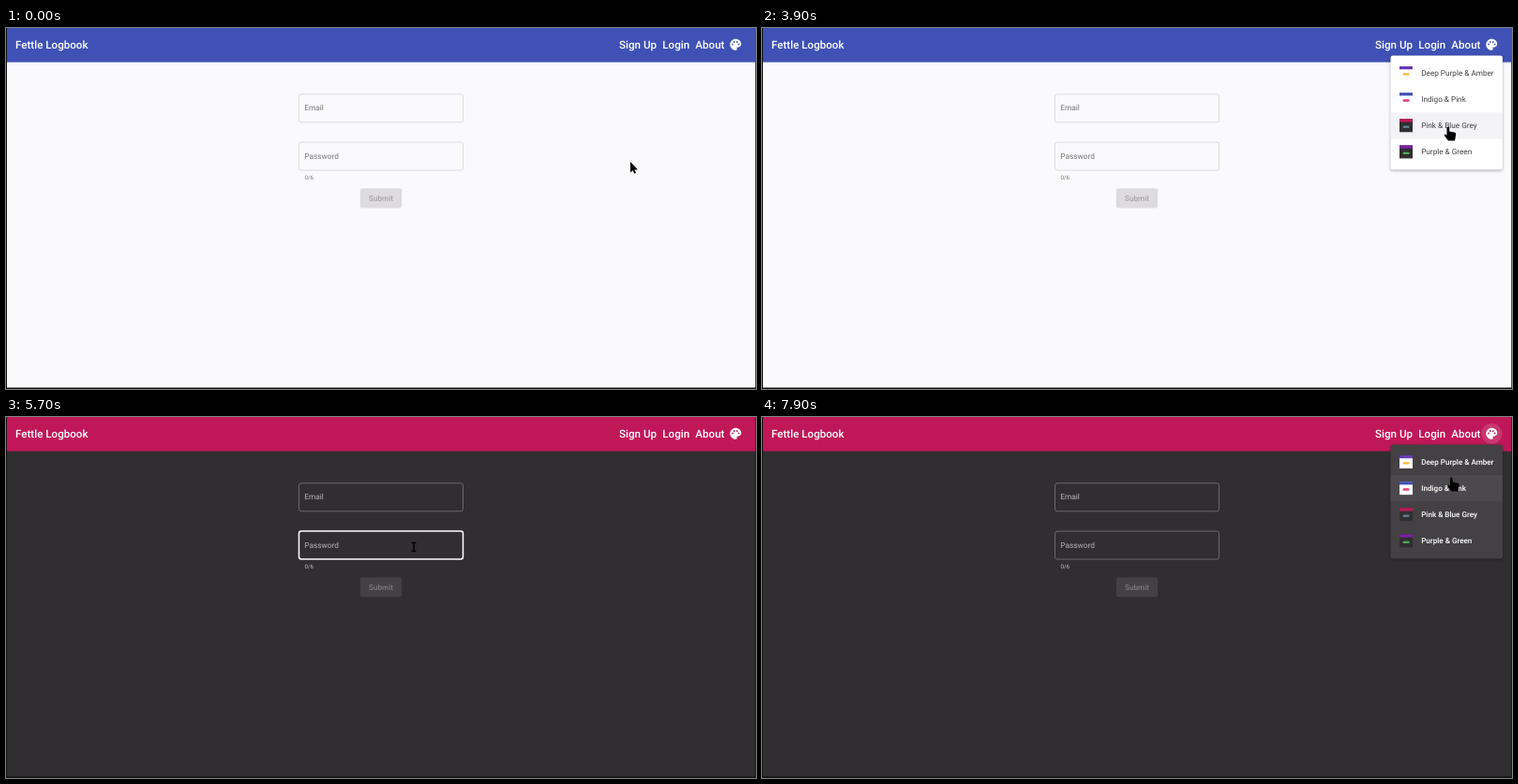
Animation of 800x386 px, one loop 8000 ms. Source, as an HTML page:

```html
<!DOCTYPE html>
<html lang="en">
<head>
<meta charset="utf-8">
<title>Theme picker</title>
<style>
html, body { margin: 0; width: 100%; height: 100%; overflow: hidden; background: #111; }
svg { display: block; width: 800px; height: 386px; font-family: Roboto, sans-serif; text-rendering: geometricPrecision;
  --bar: #3f51b5; --page: #faf9fc; --line: #dddbdf; --label: #767479; --hint: #767479;
  --button: #dddbde; --off: #a5a3a7; --menu: #fff; --hover: #f3f2f5; --item: #403e42; --strong: #29272b; }
svg.dark { --bar: #c01759; --page: #302e31; --line: #6b696d; --label: #b6b4b8; --hint: #c4c2c5;
  --button: #434144; --off: #7f7d80; --menu: #434144; --hover: #4b494d; --item: #fff; --strong: #fff; }
svg.switching { --label: #929094; --hint: #d5d3d6; --button: #3f3d40; --line: #737175; }
.nav { font-size: 11.6px; font-weight: 500; fill: #fff; }
.label { font-size: 8.3px; fill: var(--label); }
.hint { font-size: 6.15px; fill: var(--hint); }
.submit { font-size: 8.15px; font-weight: 500; fill: var(--off); text-anchor: middle; }
.item { font-size: 8.2px; fill: var(--item); }
.dark .item { font-weight: 500; font-size: 8.1px; }
.field { fill: none; stroke: var(--line); }
.field.over { stroke: var(--strong); stroke-width: 1.5; }
#panel { fill: var(--menu); filter: drop-shadow(0 1.5px 1.8px #0005); }
#hover { fill: var(--hover); }
</style>
</head>
<body>
<svg id="stage" viewBox="0 0 800 386">
  <rect width="800" height="386" fill="#111"/>
  <rect x="1" width="798.3" height="384.5" fill="var(--page)"/>
  <rect x="1" width="798.3" height="36.6" fill="var(--bar)"/>
  <g class="nav">
    <text x="10" y="22">Fettle Logbook</text>
    <text x="654" y="22">Sign Up</text>
    <text x="700.3" y="22">Login</text>
    <text x="735.3" y="22">About</text>
  </g>
  <circle id="ripple" cx="778.3" cy="17.7" r="11" fill="#fff"/>
  <g transform="translate(771.1 10.5) scale(.6)">
    <path fill="#fff" d="M12 2C6.49 2 2 6.49 2 12s4.49 10 10 10c1.38 0 2.5-1.12 2.5-2.5 0-.61-.23-1.2-.64-1.67-.08-.1-.13-.21-.13-.33 0-.28.22-.5.5-.5H16c3.31 0 6-2.69 6-6 0-4.96-4.49-9-10-9z"/>
    <g fill="var(--bar)">
      <circle cx="6.5" cy="11.5" r="1.5"/><circle cx="9.5" cy="7.5" r="1.5"/>
      <circle cx="14.5" cy="7.5" r="1.5"/><circle cx="17.5" cy="11.5" r="1.5"/>
    </g>
  </g>
  <rect id="email" class="field" x="312.5" y="70.8" width="175" height="30" rx="2.5"/>
  <text class="label" x="318.3" y="88.4">Email</text>
  <rect id="password" class="field" x="312.5" y="122.1" width="175" height="30" rx="2.5"/>
  <text class="label" x="318.3" y="139.9">Password</text>
  <text class="hint" x="318.5" y="161.5">0/6</text>
  <rect x="377.8" y="171.5" width="44.4" height="21" rx="2.3" fill="var(--button)"/>
  <text class="submit" x="400" y="184.7">Submit</text>
  <g id="menu">
    <rect id="panel" x="670.5" y="29.6" width="119.5" height="122" rx="2.3"/>
    <rect id="hover" x="670.5" width="119.5" height="28.1"/>
    <g id="items"></g>
  </g>
  <g id="cursor">
    <path id="arrow" d="M0 0V11.5L2.6 9.2 4.2 12.8 6 12 4.4 8.4H8Z"/>
    <path id="hand" d="M-1.5 1C-1.5-.7 1.2-.7 1.2 1V4.6L7 5.7Q8.4 6.1 8.2 7.8L7 14.5H0L-4 9.2Q-4.6 7.6-3 7.6L-1.5 8.8Z"/>
    <path id="beam" d="M-2.4-4.6H2.4M0-4.6V4.6M-2.4 4.6H2.4" fill="none" stroke="#000" stroke-width="1.5"/>
  </g>
</svg>
<script>
const LOOP = 8000, STEP = 100, ITEM = 28.15, MENU_TOP = 34;
const SWITCH = 4800;
const $ = id => document.getElementById(id);
const clamp = v => Math.min(1, Math.max(0, v));

const themes = [
  ['Deep Purple & Amber', '#673ab7', '#fff', '#ffb732'],
  ['Indigo & Pink', '#3f51b5', '#fff', '#e83c78'],
  ['Pink & Blue Grey', '#c2185b', '#302e31', '#607d8b'],
  ['Purple & Green', '#7b1fa2', '#302e31', '#4caf50'],
];
$('items').innerHTML = themes.map(([name, bar, page, accent], i) => `
  <g transform="translate(680 ${41 + i * ITEM})">
    <rect width="14" height="14" fill="${page}"/>
    <rect width="14" height="3.2" fill="${bar}"/>
    <rect x="3.6" y="7.2" width="7" height="2.4" rx=".8" fill="${accent}"/>
    <text class="item" x="23.2" y="9.8">${name.replace('&', '&amp;')}</text>
  </g>`).join('');

// time, x, y of the pointer
const path = [
  [0, 666, 143], [100, 666, 143], [800, 774, 20], [1200, 774, 20], [1700, 746, 46],
  [2100, 744, 50], [2500, 740, 72], [2700, 740, 72], [3100, 736, 102], [3500, 736, 133],
  [3900, 732, 106], [4300, 731, 105], [4700, 688, 125], [4800, 685, 125],
  [5500, 450, 140], [5900, 420, 138], [6400, 394, 94], [6600, 394, 94],
  [7200, 774, 19], [7500, 774, 20], [7900, 735.5, 65], [8000, 735.5, 65],
];

function pointerAt(t) {
  const i = path.findIndex(p => p[0] > t);
  const [t0, x0, y0] = path[i - 1], [t1, x1, y1] = path[i];
  const u = (t - t0) / (t1 - t0), k = u * u * (3 - 2 * u);
  return [x0 + (x1 - x0) * k, y0 + (y1 - y0) * k];
}

const pulse = (t, start, end) => clamp((t - start) / 150) * clamp((end - t) / 200);
const inside = (x, y, left, top, w, h) => x >= left && x <= left + w && y >= top && y <= top + h;

function draw(t) {
  const [x, y] = pointerAt(t);
  const stage = $('stage');
  stage.classList.toggle('dark', t >= SWITCH);
  stage.classList.toggle('switching', t >= SWITCH && t < SWITCH + 200);

  const menu = Math.max(pulse(t, 1000, 4500), pulse(t, 7350, 9000));
  $('menu').setAttribute('opacity', menu);
  $('ripple').setAttribute('opacity', .14 * Math.max(pulse(t, 950, 1800), pulse(t, 7250, 9000)));

  const row = Math.floor((y - MENU_TOP) / ITEM);
  const onItem = menu > .5 && x > 670 && x < 790 && row >= 0 && row < themes.length;
  $('hover').setAttribute('y', MENU_TOP + row * ITEM);
  $('hover').setAttribute('opacity', +onItem);

  const onEmail = inside(x, y, 312, 70, 176, 31);
  const onPassword = inside(x, y, 312, 122, 176, 31);
  $('email').classList.toggle('over', onEmail);
  $('password').classList.toggle('over', onPassword);

  const onLink = !menu && inside(x, y, 654, 8, 132, 20);
  const shape = onItem || onLink ? 'hand' : onEmail || onPassword ? 'beam' : 'arrow';
  for (const id of ['arrow', 'hand', 'beam']) $(id).setAttribute('opacity', +(id === shape));
  $('cursor').setAttribute('transform', `translate(${x} ${y})`);
}

const start = performance.now();
function tick() {
  const t = (performance.now() - start) % LOOP;
  draw(Math.floor(t / STEP) * STEP);
  requestAnimationFrame(tick);
}
tick();
</script>
</body>
</html>
```
